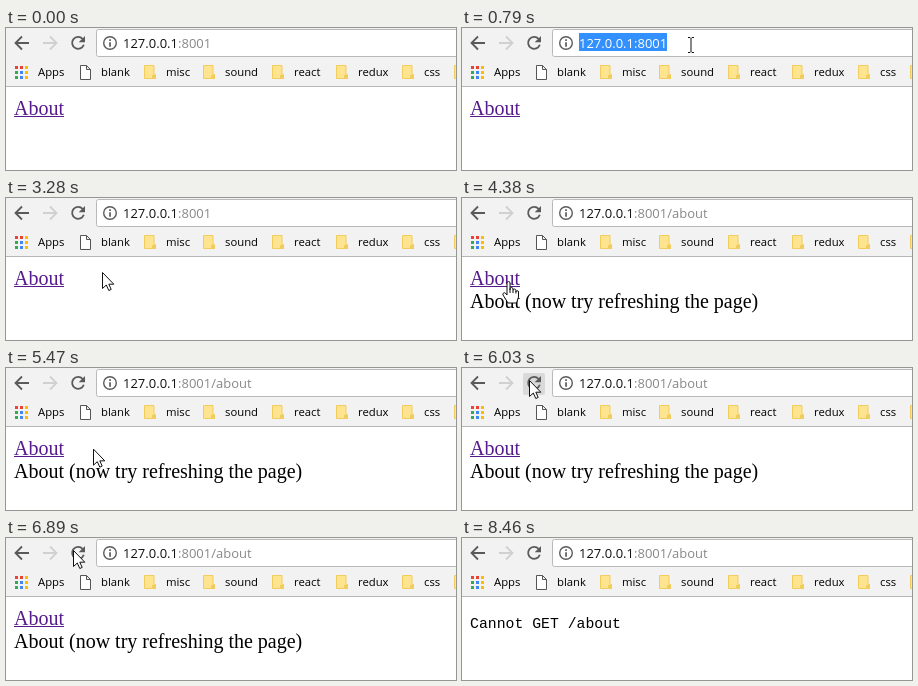
Animation of 450 by 142 pixels, one loop 9240 ms. Source, as an HTML page:

```html
<!DOCTYPE html>
<html lang="en">
<head>
<meta charset="utf-8">
<title>Route refresh</title>
<style>
html, body { margin: 0; width: 100%; height: 100%; overflow: hidden; background: #fff; }
svg { display: block; width: 100%; height: 100%; }
text { white-space: pre; }
.ui { font: 13px "Open Sans", sans-serif; }
.mark { font: 11.3px "Open Sans", sans-serif; fill: #000; }
.page { font: 20px "Liberation Serif", serif; }
.mono { font: 14.8px "Liberation Mono", monospace; }
.line { fill: none; stroke: #5a5a5a; stroke-width: 1.8; }
</style>
</head>
<body>
<svg viewBox="0 0 450 142">
  <rect width="450" height="142" fill="#fff"/>
  <rect width="450" height="58" fill="#f2f2f2"/>
  <rect y="58" width="450" height="1" fill="#b6b6b6"/>
  <rect x="90.5" y="1.5" width="380" height="27" rx="2" fill="#fff" stroke="#b9b9b9"/>

  <path class="line" d="M23 15H10M16 8.5L9.5 15L16 21.5"/>
  <path class="line" style="stroke:#d0d0d0" d="M37 15H50M44 8.5L50.5 15L44 21.5"/>
  <rect id="hover" x="61" y="5" width="22" height="22" rx="2"/>
  <g id="reload">
    <path class="line" d="M76.600 10.800A6 6 0 1 0 77.800 16.800"/>
    <path d="M79 8V14.300H72.700Z" fill="#5a5a5a"/>
  </g>
  <path id="stop" class="line" style="stroke-width:1.5" d="M66.500 9.500L77.500 20.500M77.500 9.500L66.500 20.500"/>

  <circle class="line" cx="104" cy="15" r="6.300" style="stroke-width:1.4"/>
  <path d="M103.200 11.300h1.700v1.700h-1.700zM103.200 14.200h1.700v4.600h-1.700z" fill="#5a5a5a"/>
  <rect id="select" x="117" y="5" width="88" height="18" fill="#3390ff"/>
  <text class="ui" x="117" y="19.500"><tspan id="host">127.0.0.1</tspan><tspan id="port">:8001</tspan><tspan id="route" fill="#888">/about</tspan></text>

  <g id="marks"></g>

  <g id="link">
    <text class="page" x="8" y="87">About</text>
    <rect x="8" y="88" width="50" height="1"/>
  </g>
  <text id="about" class="page" x="8" y="110">About (now try refreshing the page)</text>
  <text id="error" class="mono" x="8" y="90">Cannot GET /about</text>

  <g id="cursor" fill="#fff" stroke="#111" stroke-linejoin="round">
    <path id="arrow" d="M.5 .5V16.500L4.300 13L6.800 18.500L9.200 17.400L6.800 12.200H11.800Z"/>
    <path id="beam" fill="none" d="M-3 -7.500H-1L0 -6.500L1 -7.500H3M0 -6.500V6.500M-3 7.500H-1L0 6.500L1 7.500H3"/>
    <g id="hand">
      <path d="M-1.500 13V1a1.500 1.500 0 0 1 3 0V8V7a1.500 1.500 0 0 1 3 0V8.500a1.400 1.400 0 0 1 2.900 0V10a1.300 1.300 0 0 1 2.600 0V15L8 21H-.5L-5.500 13a1.600 1.600 0 0 1 2.300-2Z"/>
      <path d="M1.500 8V11M4.500 8.500V11M7.400 10V11.500"/>
    </g>
  </g>
</svg>
<script>
const LOOP = 9240, STEP = 80;
const el = {};
document.querySelectorAll('[id]').forEach(node => el[node.id] = node);

const label = (x, text) => `<text class="mark" x="${x}" y="48">${text}</text>`;
const folder = x => `<path d="M${x + .5} 37.500h9.500v9h1.500v4h-11z" fill="#ffe48f" stroke="#f0cd5c"/>
  <path d="M${x + 8} 47h4v4h-4z" fill="#f0cd5c"/>`;

function bookmarks() {
  const colors = ['#ea4335', '#ea4335', '#fbbc05', '#34a853', '#4285f4', '#fbbc05', '#34a853', '#4285f4', '#fbbc05'];
  const dots = colors.map((c, i) =>
    `<rect x="${9 + i % 3 * 5}" y="${38 + Math.floor(i / 3) * 5}" width="3" height="3" fill="${c}"/>`);
  const sheet = '<path d="M74.500 37.500h6l4 4v10h-10zM80.500 37.500v4h4" fill="#fff" stroke="#555"/>';
  const folders = [[138, 'misc'], [197, 'sound'], [266, 'react'], [330, 'redux'], [396, 'css'], [448, '']];
  return dots.join('') + label(32, 'Apps') + sheet + label(95, 'blank') +
    folders.map(([x, name]) => folder(x) + label(x + 22, name)).join('');
}
el.marks.innerHTML = bookmarks();

// Pointer runs: keys of [time, x, y], resting after the last key.
const runs = [
  [[150, 301, 95], [310, 258, 55], [470, 230, 17], [550, 225.5, 14]],
  [[710, 232, 10], [790, 229, 17], [870, 225.5, 14]],
  [[2880, 225.5, 14], [3040, 186, 28], [3280, 96, 74], [3520, 66, 86], [3840, 46.5, 84]],
  [[5230, 46.5, 84], [5390, 75, 90], [5630, 111, 62], [5870, 84, 24], [6030, 67, 12]],
  [[7900, 67, 12], [8060, 135, 38], [8220, 255, 82], [8460, 452, 144]]
];

function pointer(time) {
  const run = runs.filter(r => time >= r[0][0]).pop();
  const t = run[0][0] + Math.floor((time - run[0][0]) / STEP) * STEP;
  const i = run.findIndex(key => key[0] > t);
  if (i < 0) return run[run.length - 1].slice(1);
  const [a, b] = [run[i - 1], run[i]];
  const u = (t - a[0]) / (b[0] - a[0]);
  return [1, 2].map(n => a[n] + (b[n] - a[n]) * u);
}

const show = (node, on) => node.style.display = on ? '' : 'none';

function drawCursor(t) {
  const on = t >= 150 && t < 8460;
  show(el.cursor, on);
  if (!on) return;
  const [x, y] = pointer(t);
  const beam = x > 90 && y < 28;
  const hand = x < 59 && y > 70 && y < 93;
  show(el.beam, beam);
  show(el.hand, hand);
  show(el.arrow, !beam && !hand);
  el.cursor.setAttribute('transform', `translate(${x} ${y})`);
}

function draw(t) {
  const within = (a, b) => t >= a && t < b;
  const failed = t >= 6970;
  const loading = within(1880, 2500);
  const selected = within(790, 1880);

  show(el.stop, loading);
  show(el.reload, !loading);
  show(el.select, selected);
  el.host.setAttribute('fill', selected ? '#fff' : '#111');
  el.port.setAttribute('fill', selected ? '#fff' : '#888');
  show(el.route, t >= 4380);

  show(el.link, !failed && !within(2190, 2350));
  el.link.setAttribute('fill', within(4230, 4380) ? '#e00' : '#551a8b');
  show(el.about, within(4380, 6970));
  show(el.error, failed);

  const fade = Math.floor((t - 6340) / STEP) / 6;
  const shade = within(6030, 6340) ? .1 : within(6340, 6890) ? .18 * Math.max(0, 1 - fade) : 0;
  el.hover.setAttribute('fill-opacity', shade);
  drawCursor(t);
}

function tick() {
  draw(performance.now() % LOOP);
  requestAnimationFrame(tick);
}
tick();
</script>
</body>
</html>
```
